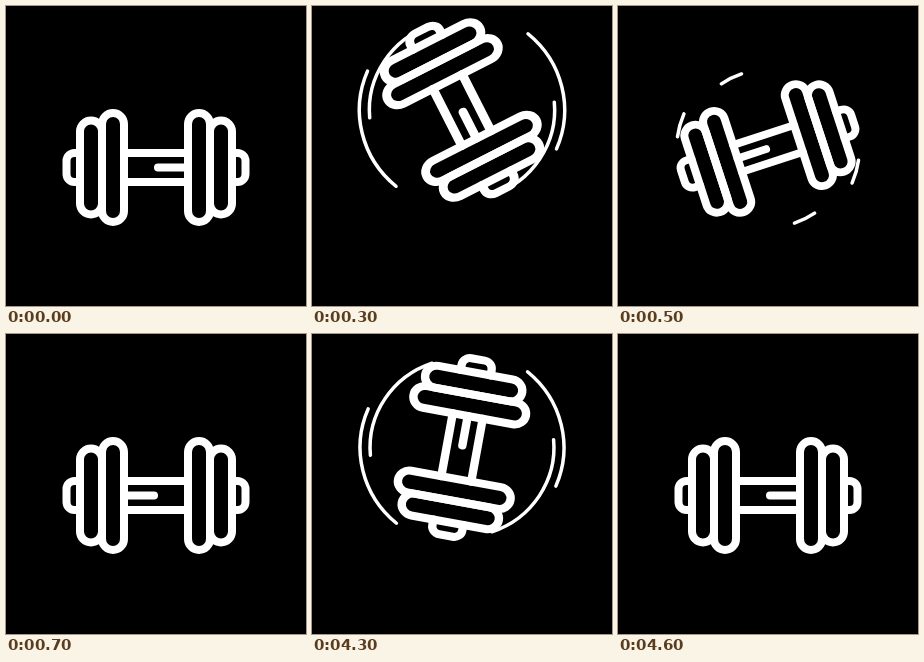
These frames come from a looping animation (300 by 300 pixels, 8100 ms). An HTML page with a canvas:

```html
<!DOCTYPE html>
<html>
<head>
<meta charset="utf-8">
<title>Dumbbell flip</title>
<style>
html, body { margin: 0; height: 100%; overflow: hidden; background: #000; }
canvas { display: block; width: 100vw; height: 100vh; }
</style>
</head>
<body>
<canvas id="stage" width="300" height="300"></canvas>
<script>
const ctx = document.getElementById('stage').getContext('2d');
const LOOP = 8100, STEP = 100, REST_Y = 161.5;

// Times in ms; lift is the height of the hop.
const flips = [
  { from: 100, turnStart: 103, turnSpan: 494, hopStart: 50, hopSpan: 557, lift: 59 },
  { from: 4100, turnStart: 3950, turnSpan: 650, hopStart: 3970, hopSpan: 560, lift: 52 }
];

const ramp = (x, start, span) => Math.min(1, Math.max(0, (x - start) / span));
const smooth = x => x * x * (3 - 2 * x);
const rad = deg => deg * Math.PI / 180;

function poseAt(t) {
  let angle = 0, hop = 0, lift = 0;
  for (const f of flips) {
    if (t < f.from) break;
    angle += 180 * smooth(ramp(t, f.turnStart, f.turnSpan));
    hop = ramp(t, f.hopStart, f.hopSpan);
    lift = f.lift;
  }
  const arch = Math.sin(Math.PI * hop);
  return {
    angle, hop, arch,
    y: REST_Y - lift * arch ** 2,
    thick: 1 + 0.1 * arch + 0.09 * Math.sin(2 * Math.PI * hop)
  };
}

function line(x1, y1, x2, y2) {
  ctx.beginPath();
  ctx.moveTo(x1, y1);
  ctx.lineTo(x2, y2);
  ctx.stroke();
}

function plate(x, halfHeight) {
  ctx.beginPath();
  ctx.roundRect(x, -halfHeight, 22, 2 * halfHeight, 11);
  ctx.stroke();
}

function halfDumbbell() {
  plate(32, 54.5);
  plate(54, 47);
  ctx.beginPath();
  ctx.moveTo(76, -14.5);
  ctx.arcTo(89.5, -14.5, 89.5, 0, 8);
  ctx.arcTo(89.5, 14.5, 76, 14.5, 8);
  ctx.lineTo(76, 14.5);
  ctx.stroke();
  line(-32, -14.5, 32, -14.5);
}

// Grows forward from its start angle, then its tail catches up.
function trail(radius, start, sweep, hop, delay) {
  const head = ramp(hop, delay, 0.08), tail = ramp(hop, 0.65, 0.2);
  if (head <= tail) return;
  ctx.beginPath();
  ctx.arc(0, 0, radius, rad(start + sweep * tail), rad(start + sweep * head));
  ctx.stroke();
}

// Runs a drawing twice, the second time turned by half a circle.
function twice(draw) {
  for (let i = 0; i < 2; i++) {
    draw();
    ctx.rotate(Math.PI);
  }
}

function render(time) {
  const { angle, hop, arch, y, thick } = poseAt(Math.floor(time / STEP) * STEP);
  ctx.resetTransform();
  ctx.fillStyle = '#000';
  ctx.fillRect(0, 0, 300, 300);
  ctx.strokeStyle = '#fff';
  ctx.lineCap = ctx.lineJoin = 'round';
  ctx.translate(150, y);

  ctx.save();
  ctx.scale(1, 0.97);
  ctx.lineWidth = 3.5;
  const radius = 76 + 27 * arch;
  twice(() => {
    trail(radius, -50, 73, hop, 0.235);
    trail(radius - 10, -5, 76, hop, 0.3);
  });
  ctx.restore();

  ctx.rotate(rad(angle));
  ctx.scale(1, thick);
  ctx.lineWidth = 8;
  twice(halfDumbbell);
  line(2, 0, 32, 0);
}

let begin;
function tick(now) {
  begin ??= now;
  render((now - begin) % LOOP);
  requestAnimationFrame(tick);
}
requestAnimationFrame(tick);
</script>
</body>
</html>
```
